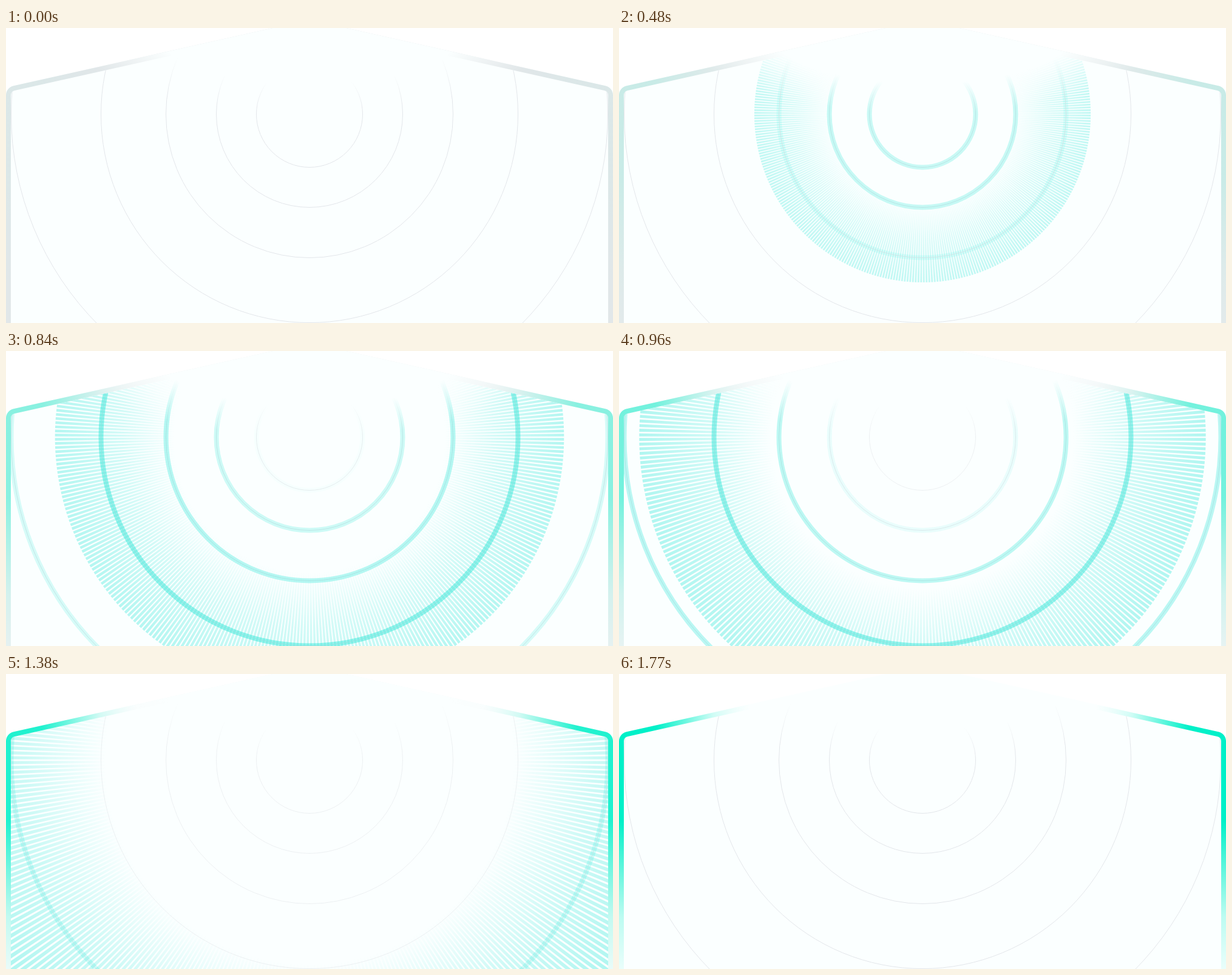
These frames come from a looping animation (1000x486 px, 1800 ms). An HTML page with a canvas:

```html
<!DOCTYPE html>
<html lang="en">
<head>
<meta charset="utf-8">
<title>Radar pulse</title>
<style>
html, body { margin: 0; width: 100%; height: 100%; overflow: hidden; background: #fff; }
canvas { display: block; width: 100vw; height: 100vh; }
</style>
</head>
<body>
<canvas id="stage" width="1000" height="486"></canvas>
<script>
const ctx = document.getElementById('stage').getContext('2d');
const W = 1000, H = 486, CX = 500, CY = 142;
const LOOP = 1800, STEP = 30;
const PANEL = '#fbffff', LINE = '#e3e6ea', EDGE = '#e2e7e9';
const RAYS = 384, DUTY = 0.64;

// Glow of each ring: radius, start, end, rise and fall times, peak opacity
const rings = [
  { r: 87.5, start: 0, end: 880, rise: 300, fall: 460, peak: 0.24 },
  { r: 153.5, start: 180, end: 1030, rise: 400, fall: 280, peak: 0.28 },
  { r: 236.5, start: 370, end: 1150, rise: 330, fall: 210, peak: 0.28 },
  { r: 343.5, start: 560, end: 1340, rise: 220, fall: 290, peak: 0.4 },
  { r: 491.5, start: 680, end: 1490, rise: 470, fall: 310, peak: 0.45 }
];

const ramp = (t, a, b) => Math.min(1, Math.max(0, (t - a) / (b - a)));
const teal = a => `rgba(10,226,208,${a})`;
const mint = a => `rgba(0,240,200,${a})`;

// Panel outline moved inwards by d
function shape(d) {
  const y = 98 + 1.025 * d, slope = 0.223;
  const left = y - slope * d;
  const r = 16 - d;
  const p = new Path2D();
  p.moveTo(d, H + 20);
  p.arcTo(d, left, CX, y - slope * CX, r);
  p.lineTo(CX, y - slope * CX);
  p.arcTo(W - d, left, W - d, H + 20, r);
  p.lineTo(W - d, H + 20);
  p.closePath();
  return p;
}
const outer = shape(0), middle = shape(4), inner = shape(8);

function drawRays(t) {
  const r = 87.5 + 0.395 * t;
  const power = (0.24 + 0.1 * ramp(t, 480, 1170)) * ramp(t, 0, 300) * (1 - ramp(t, 1400, 1740));
  if (power <= 0) return;
  const g = ctx.createRadialGradient(CX, CY, r * 0.53, CX, CY, r);
  g.addColorStop(0, teal(0));
  g.addColorStop(0.45, teal(power * 0.56));
  g.addColorStop(1, teal(power));
  const step = 2 * Math.PI / RAYS, half = step * DUTY / 2;
  ctx.beginPath();
  for (let i = 0; i < RAYS; i++) {
    const a = (i + 0.5) * step;
    const point = (rad, ang) => [CX + rad * Math.cos(ang), CY + rad * Math.sin(ang)];
    ctx.moveTo(...point(r * 0.5, a - half));
    ctx.lineTo(...point(r, a - half));
    ctx.lineTo(...point(r, a + half));
    ctx.lineTo(...point(r * 0.5, a + half));
    ctx.closePath();
  }
  ctx.fillStyle = g;
  ctx.fill();
}

function drawRing(ring, t) {
  const { r, start, end, rise, fall, peak } = ring;
  const glow = peak * Math.min(ramp(t, start, start + rise), 1 - ramp(t, end - fall, end));
  const dim = 0.4 * ramp(t, end - 150, end) * (1 - ramp(t, 1400, 1750));
  ctx.beginPath();
  ctx.arc(CX, CY, r, 0, 2 * Math.PI);
  ctx.globalAlpha = 1 - dim;
  ctx.lineWidth = 1;
  ctx.strokeStyle = LINE;
  ctx.stroke();
  ctx.globalAlpha = 1;
  if (glow > 0) {
    ctx.lineWidth = 8;
    ctx.strokeStyle = teal(glow);
    ctx.stroke();
  }
}

function fadeStops(g, stops, color) {
  stops.forEach(([at, a]) => g.addColorStop(at, color(a)));
  return g;
}

function strokePart(y, h, paint) {
  ctx.save();
  ctx.beginPath();
  ctx.rect(0, y, W, h);
  ctx.clip();
  ctx.strokeStyle = paint;
  ctx.stroke(middle);
  ctx.restore();
}

function drawBorder(t) {
  const p = 0.03 + 0.97 * ramp(t, 370, 1540);
  ctx.lineWidth = 8;
  ctx.strokeStyle = PANEL;
  ctx.stroke(middle);

  ctx.globalAlpha = 1 - p;
  ctx.strokeStyle = EDGE;
  ctx.stroke(middle);

  ctx.globalAlpha = p;
  const side = [[0, 1], [0.06, 1], [0.155, 0.18], [0.215, 0]];
  const across = ctx.createLinearGradient(0, 0, W, 0);
  fadeStops(across, side, mint);
  fadeStops(across, side.map(([at, a]) => [1 - at, a]), mint);
  const down = ctx.createLinearGradient(0, CY, 0, H);
  fadeStops(down, [[0, 1], [0.29, 1], [0.5, 0.65], [0.75, 0.25], [1, 0.07]], mint);
  strokePart(0, CY, across);
  strokePart(CY, H - CY, down);
  ctx.globalAlpha = 1;
}

// Soft elliptical veil that hides everything near the top centre
function drawVeil() {
  ctx.save();
  ctx.clip(outer);
  ctx.translate(CX, 0);
  ctx.scale(256, 91.5);
  const g = ctx.createRadialGradient(0, 0, 1, 0, 0, 1.55);
  g.addColorStop(0, 'rgba(251,255,255,1)');
  g.addColorStop(1, 'rgba(251,255,255,0)');
  ctx.fillStyle = g;
  ctx.fillRect(-2, -1, 4, 4);
  ctx.restore();
}

function draw(t) {
  ctx.fillStyle = '#fff';
  ctx.fillRect(0, 0, W, H);
  ctx.fillStyle = PANEL;
  ctx.fill(outer);
  ctx.save();
  ctx.clip(inner);
  drawRays(t);
  rings.forEach(ring => drawRing(ring, t));
  ctx.restore();
  drawBorder(t);
  drawVeil();
}

function tick() {
  const t = performance.now() % LOOP;
  draw(Math.floor(t / STEP) * STEP);
  requestAnimationFrame(tick);
}
tick();
</script>
</body>
</html>
```
